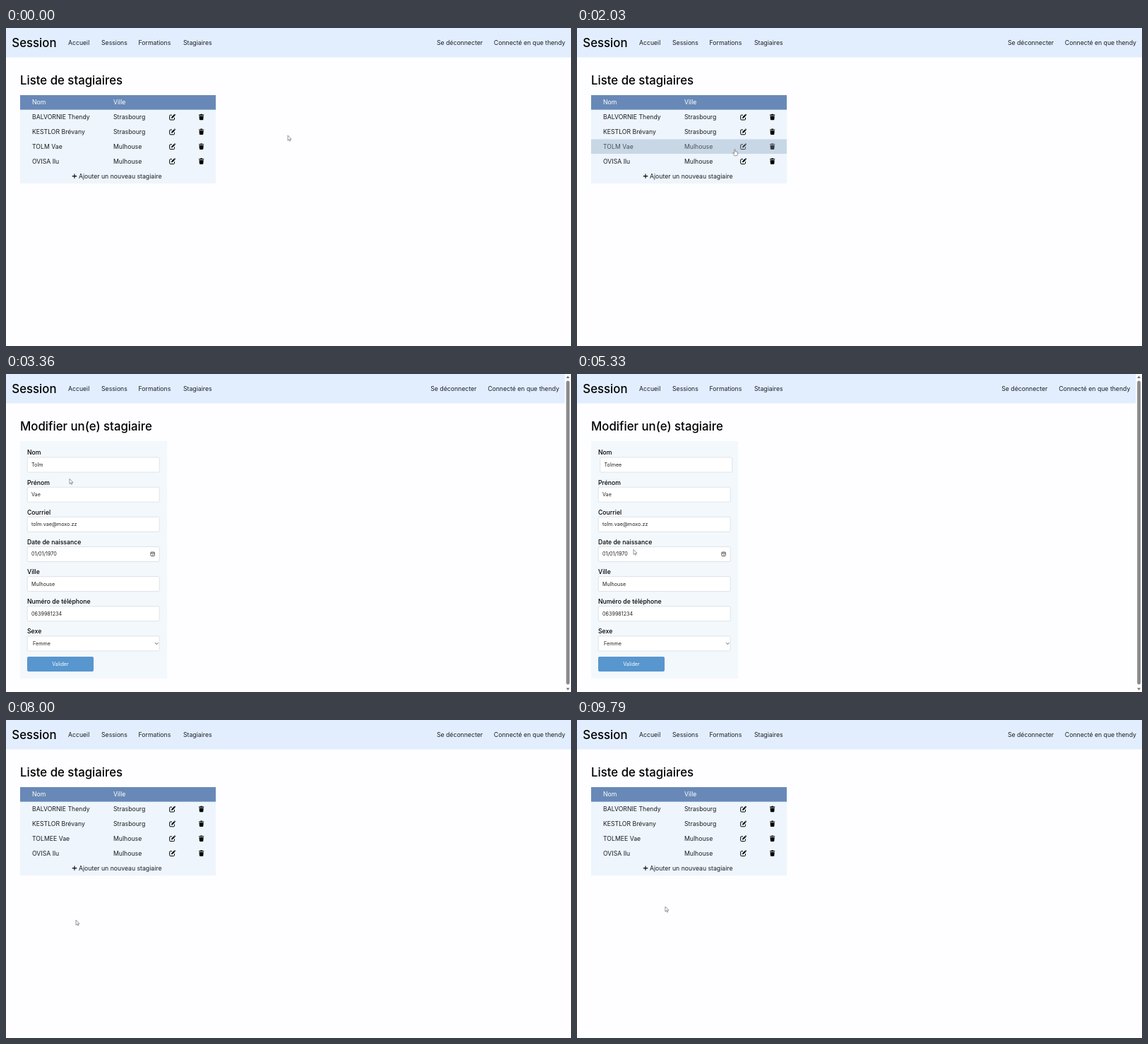
Recreate the animation shown at these times as an HTML page. Size 800 by 450 pixels, loop 9.82 s.

```html
<!DOCTYPE html>
<html lang="fr">
<head>
<meta charset="utf-8">
<style>
  html, body { margin: 0; width: 100%; height: 100%; overflow: hidden; background: #fefdff; }
  svg { display: block; width: 800px; height: 450px; }
  text { font: 8.7px Inter, "Open Sans", sans-serif; fill: #1c1e22; white-space: pre; }
  .title { font-size: 16.8px; font-weight: 500; fill: #000; }
  .label { font-weight: 500; fill: #000; }
  .value { font-size: 7.2px; fill: #222; }
  .light { fill: #fff; }
  .end { text-anchor: end; }
  .mid { text-anchor: middle; }
  .hover rect { fill: #c8d7e6; }
  .hover .ink { opacity: .72; }
</style>
</head>
<body>
<svg id="stage" viewBox="0 0 800 450">
  <defs>
    <g id="edit">
      <path d="M235 123.2h-2.3q-1 0-1 1v4.8q0 1 1 1h4.8q1 0 1-1v-2.2" fill="none" stroke="#000" stroke-width="1"/>
      <path d="M234 127.8l.4-1.9 3.3-3.3 1.5 1.5-3.3 3.3zM238 122.2l.5-.4q.4-.2.8.2l.6.6q.3.4 0 .8l-.4.4z"/>
    </g>
    <path id="trash" d="M273 122.6h2l.5-.8h2.2l.5.8h2v1.1H273zM273.5 124.4h6.2l-.4 5.1q-.1.8-.9.8h-3.6q-.8 0-.9-.8z"/>
  </defs>
  <rect width="800" height="41.5" fill="#e2eefe"/>
  <text class="title" x="8.3" y="27">Session</text>
  <text x="88" y="24">Accueil</text>
  <text x="135" y="24">Sessions</text>
  <text x="187.5" y="24">Formations</text>
  <text x="251" y="24">Stagiaires</text>
  <g id="account">
    <text class="end" x="675" y="24">Se déconnecter</text>
    <text class="end" x="792" y="24">Connecté en que thendy</text>
  </g>

  <g id="listPage">
    <text class="title" x="20" y="80">Liste de stagiaires</text>
    <rect x="20" y="95" width="277" height="125" fill="#eef5fc"/>
    <rect x="20" y="95" width="277" height="20.8" fill="#6889b7"/>
    <text class="light" x="37" y="108.4">Nom</text>
    <text class="light" x="152" y="108.4">Ville</text>
    <g id="rows"></g>
    <path d="M93.8 209.6h6.4M97 206.4v6.4" stroke="#000" stroke-width="1.1"/>
    <text x="103" y="212.6">Ajouter un nouveau stagiaire</text>
  </g>

  <g id="formPage">
    <text class="title" x="20" y="80">Modifier un(e) stagiaire</text>
    <rect x="20" y="95" width="208" height="336" fill="#f3f8fc"/>
    <g id="fields"></g>
    <g fill="none" stroke="#333" stroke-width=".8">
      <rect x="204.9" y="252" width="5.4" height="5.6" rx=".8"/>
      <path d="M205 253.7h5.2M207 255.8h1.8M211 380.2l2.3 2.3 2.3-2.3"/>
    </g>
    <rect x="30" y="400" width="94" height="21" rx="2" fill="#5796ce"/>
    <text class="value light mid" x="77" y="413.2">Valider</text>
    <rect x="791.3" width="8.7" height="450" fill="#fcfcfc"/>
    <rect x="793.2" y="9.5" width="4.8" height="430" rx="2.4" fill="#8a8a8a"/>
    <path d="M793.2 6l2.4-3.4L798 6zM793.2 444.3l2.4 3.4 2.4-3.4z" fill="#777"/>
  </g>

  <g id="cursor" fill="#fff" stroke="#555" stroke-width=".6" stroke-linejoin="round">
    <path id="arrow" d="M0 0v7.2l1.6-1.5 1.1 2.4 1.1-.5-1.1-2.3H5z"/>
    <path id="hand" d="M-.7.8q.7-1 1.4 0v3l2.6.6q1 .3.9 1.4l-.5 2.4-.7 1.5H-.6l-2-3.3q-.3-1 .5-.9l1.4 1z"/>
    <path id="beam" d="M-1.3-3.8h2.6M0-3.8v7.6M-1.3 3.8h2.6"/>
  </g>
</svg>
<script>
const LOOP = 9820, OPEN_FORM = 3060, BACK_TO_LIST = 7760;
const FOCUS = 3800, BLUR = 5900, KEYS = [4550, 4790];
const ROW = 20.8, FIELD = 42.15;
const $ = id => document.getElementById(id);

const people = [['BALVORNIE Thendy', 'Strasbourg'], ['KESTLOR Brévany', 'Strasbourg'],
                ['TOLM Vae', 'Mulhouse'], ['OVISA Ilu', 'Mulhouse']];
$('rows').innerHTML = people.map(([name, city], i) => `
  <g transform="translate(0 ${i * ROW})">
    <rect x="20" y="115.8" width="277" height="${ROW}" fill="#eef5fc"/>
    <g class="ink"><text x="37" y="129.3">${name}</text><text x="152" y="129.3">${city}</text>
    <use href="#edit"/><use href="#trash"/></g>
  </g>`).join('');

const fields = [['Nom', 'Tolm'], ['Prénom', 'Vae'], ['Courriel', 'tolm.vae@moxo.zz'],
                ['Date de naissance', '01/01/1970'], ['Ville', 'Mulhouse'],
                ['Numéro de téléphone', '0639981234'], ['Sexe', 'Femme']];
$('fields').innerHTML = fields.map(([label, value], i) => `
  <g transform="translate(0 ${i * FIELD})">
    <text class="label" x="30" y="114.4">${label}</text>
    <g class="input"><rect x="30.2" y="118" width="187" height="21" rx="1.5" fill="#fff" stroke="#d3d8de" stroke-width=".7"/>
    <text class="value" x="${i == 6 ? 38 : 36}" y="131">${value}</text></g>
  </g>`).join('');

const rows = [...$('rows').children];
const editedName = rows[2].querySelector('text');
const nameInput = document.querySelector('.input');
const nameValue = nameInput.querySelector('text');

// time, x, y of the pointer tip
const path = [[0, 399, 152], [1000, 110, 167], [1350, 60, 167], [1600, 80, 169], [2030, 223.5, 171],
  [2250, 234, 168], [3040, 234, 168], [3360, 90, 148.3], [3750, 60, 128], [4030, 45, 128],
  [4270, 85, 139.5], [4970, 85, 139.5], [5330, 80, 248.3], [5900, 106, 408], [6300, 120, 429],
  [6580, 124, 422.6], [6940, 98, 409], [7760, 98, 409], [8000, 99, 283], [8700, 118, 263],
  [9700, 124.5, 264], [LOOP, 125, 264]];

const clamp = v => Math.min(1, Math.max(0, v));
const smooth = v => v * v * (3 - 2 * v);
const show = (id, on) => $(id).style.display = on ? '' : 'none';

function pointerAt(t) {
  const i = path.findIndex(p => p[0] > t);
  const [t0, x0, y0] = path[i - 1], [t1, x1, y1] = path[i];
  const k = smooth((t - t0) / (t1 - t0));
  return [x0 + (x1 - x0) * k, y0 + (y1 - y0) * k];
}

function draw(now) {
  const t = now % LOOP, [x, y] = pointerAt(t);
  const form = t >= OPEN_FORM && t < BACK_TO_LIST;
  show('listPage', !form);
  show('formPage', form);
  $('account').setAttribute('transform', `translate(${form ? -8.7 : 0} 0)`);

  const row = !form && x > 20 && x < 297 ? Math.floor((y - 115.8) / ROW) : -1;
  rows.forEach((r, i) => r.classList.toggle('hover', i === row));
  editedName.textContent = t < BACK_TO_LIST ? 'TOLM Vae' : 'TOLMEE Vae';

  nameValue.textContent = 'Tolm' + 'e'.repeat(KEYS.filter(k => t >= k).length);
  const shift = 2.5 * (smooth(clamp((t - FOCUS) / 200)) - smooth(clamp((t - BLUR) / 200)));
  nameInput.setAttribute('transform', `translate(${shift} 0)`);

  const onButton = form && x > 30 && x < 124 && y > 400 && y < 421;
  const hand = row >= 0 && row < 5 || onButton;
  const beam = form && x > 30 && x < 218 && y > 118 && y < 139;
  show('hand', hand);
  show('beam', beam);
  show('arrow', !hand && !beam);
  $('cursor').setAttribute('transform', `translate(${x} ${y})`);
}

const start = performance.now();
function tick() {
  draw(performance.now() - start);
  requestAnimationFrame(tick);
}
tick();
</script>
</body>
</html>
```
